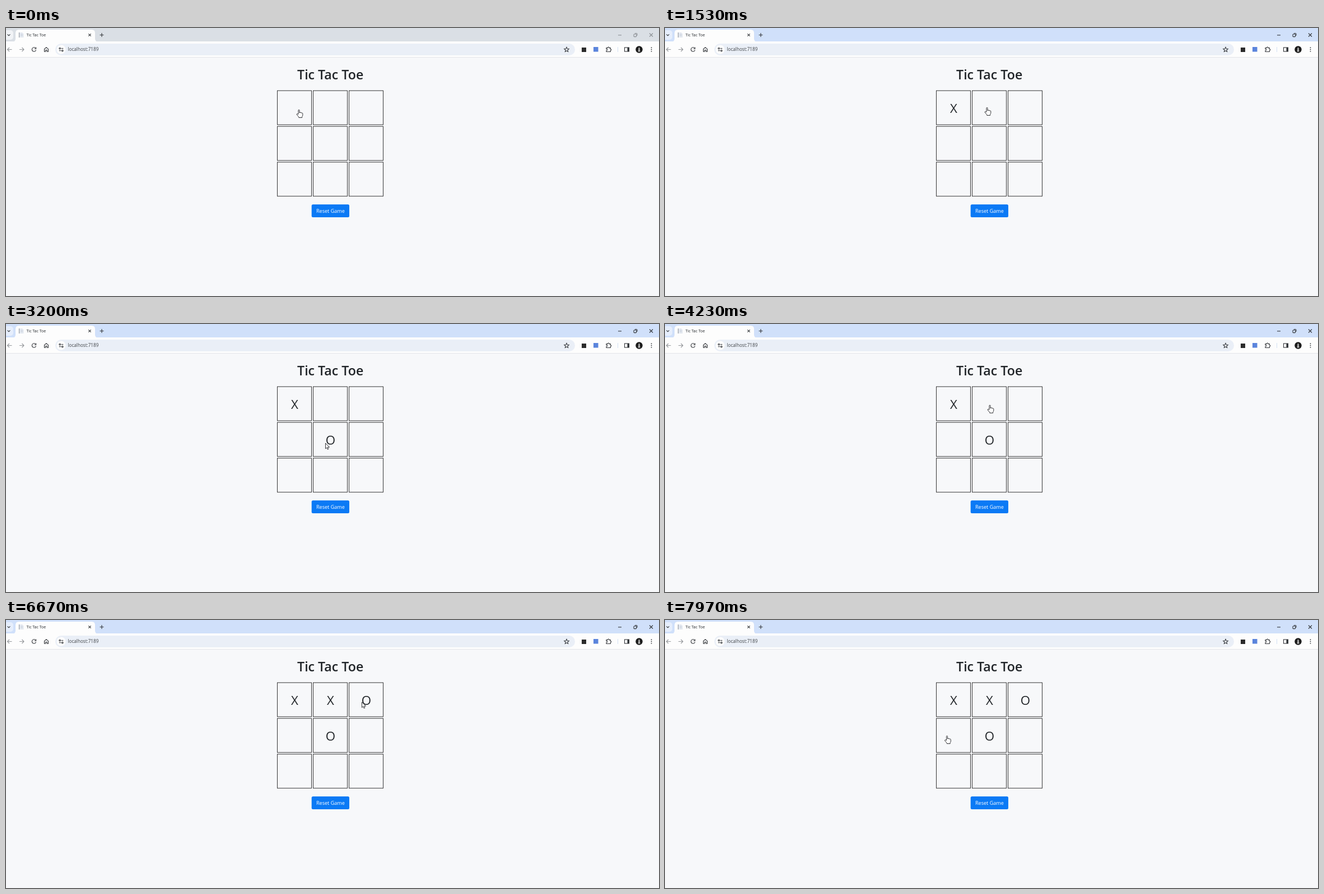
Recreate the animation shown at these times as an HTML page. Size 1166 by 480 pixels, loop 8 s.

```html
<!DOCTYPE html>
<html lang="en">
<head>
<meta charset="utf-8">
<title>Tic Tac Toe</title>
<style>
  html, body { margin: 0; width: 100%; height: 100%; overflow: hidden; background: #f7f8fa; }
  svg { display: block; width: 1166px; height: 480px; }
  text { font-family: "Open Sans", "Noto Sans", sans-serif; fill: #212529; }
  .mid { text-anchor: middle; }
  .mark { font-size: 22.3px; }
  .icon { fill: none; stroke: #33363a; stroke-width: 1.1; }
  .dim { stroke: #94979b; }
  .cell { fill: none; stroke: #363636; }
  .pointer { fill: #fff; stroke: #1d1f22; stroke-width: .9; stroke-linejoin: round; }
</style>
</head>
<body>
<svg viewBox="0 0 1166 480">
  <rect width="1166" height="480" fill="#f7f8fa"/>

  <!-- tab strip -->
  <rect id="strip" width="1166" height="25"/>
  <rect id="menu" x="-6" y="4" width="19" height="17" rx="5"/>
  <path class="icon" d="M2.6 11.3L5 13.7L7.4 11.3"/>
  <path fill="#fdfdfd" d="M12 25Q17 24 17 19V9Q17 3 23 3H153Q159 3 159 9V19Q159 24 164 25Z"/>
  <path d="M23 8H29L31.5 10.5V17H23Z" fill="#e3e8f0"/>
  <path d="M23.5 8V17" stroke="#8f959d"/>
  <path d="M26 11.5H30M26 13.5H30" stroke="#c3cbd8" stroke-width=".7"/>
  <text x="36.5" y="15.2" font-size="7">Tic Tac Toe</text>
  <path class="icon" d="M147.3 10.3L151.7 14.7M151.7 10.3L147.3 14.7"/>
  <path class="icon" d="M167.6 12.5H174.4M171 9.1V15.9"/>
  <g id="controls" class="icon">
    <path d="M1093 12.8H1099"/>
    <rect x="1121" y="11" width="4.6" height="4.6" rx="1"/>
    <path d="M1122.8 9.5H1125.6Q1127 9.5 1127 11V13.8"/>
    <path d="M1149 9.5L1155 15.5M1155 9.5L1149 15.5"/>
  </g>

  <!-- toolbar -->
  <rect y="24" width="1166" height="28" fill="#fdfdfd"/>
  <path d="M0 52.5H1166" stroke="#e3e5e9"/>
  <rect x="88" y="28" width="928" height="21" rx="10.5" fill="#eaeff7"/>
  <circle cx="98.5" cy="38.5" r="8" fill="#fdfdfd"/>
  <path class="icon dim" d="M10.5 38.5H2.5M6 35L2.5 38.5L6 42"/>
  <path class="icon dim" d="M24 38.5H32M28.5 35L32 38.5L28.5 42"/>
  <path class="icon" d="M52.7 36A3.6 3.6 0 1 0 53.5 39.3M53.6 34.6V37.3H50.9"/>
  <path class="icon" d="M68.5 37.7L72 34.8L75.5 37.7V42.3H73.2V39.5H70.8V42.3H68.5Z"/>
  <g class="icon">
    <circle cx="96.2" cy="36.6" r="1.3"/><path d="M98.8 36.6H102.3"/>
    <circle cx="100.8" cy="40.6" r="1.3"/><path d="M94.8 40.6H98.2"/>
  </g>
  <text x="110.5" y="41.4" font-size="8.15" style="fill:#3f4347">localhost:7189</text>
  <path class="icon" d="M1001 34.3L1002.2 37.1L1005.2 37.4L1002.9 39.4L1003.6 42.4L1001 40.8L998.4 42.4L999.1 39.4L996.8 37.4L999.8 37.1Z"/>
  <rect x="1028" y="35" width="8" height="8" fill="#2b2b2b"/>
  <rect x="1049" y="34" width="8.5" height="8.5" fill="#5b84dc"/>
  <path class="icon" d="M1072 35.6H1074.4Q1074.4 34 1075.7 34T1077 35.6H1079.3V37.8Q1080.8 37.8 1080.8 39T1079.3 40.2V42.5H1072V40.5Q1073.7 40.4 1073.7 39T1072 37.6Z"/>
  <path d="M1092.5 34V43" stroke="#d3e0f4"/>
  <rect class="icon" x="1104.5" y="35" width="8" height="7"/>
  <path d="M1109.5 35H1112.5V42H1109.5Z" fill="#33363a"/>
  <circle cx="1130.5" cy="38.5" r="6.2" fill="#1b1b1b"/>
  <path d="M1129.3 36.2a1.2 1.2 0 1 1 2.4 0V38L1132.6 42.6H1128.4L1129.3 38Z" fill="#b5b5b5"/>
  <g fill="#33363a">
    <circle cx="1152.5" cy="35.2" r=".9"/><circle cx="1152.5" cy="38.5" r=".9"/><circle cx="1152.5" cy="41.8" r=".9"/>
  </g>

  <!-- page -->
  <text class="mid" x="579.2" y="92.3" font-size="23.2" font-weight="600">Tic Tac Toe</text>
  <g id="board"></g>
  <rect x="545.7" y="316" width="67.3" height="23" rx="2.5" fill="#0b7af5"/>
  <text class="mid" x="579.4" y="331" font-size="9.1" style="fill:#fff">Reset Game</text>

  <path id="hand" class="pointer" d="M-1 8V1a1 1 0 0 1 2 0V5.5Q1 4.5 2 4.5T3 5.5Q3.2 4.8 4 4.9T5 6Q5.3 5.4 6 5.6T6.8 6.8V9.5Q6.8 11 5.6 12.2V14H-.2V12.8L-3.8 8.6Q-4.2 7.2 -2.8 7.1Z"/>
  <path id="arrow" class="pointer" d="M0 0V9.8L2.2 7.8L3.7 11.2L5.3 10.5L3.8 7.2H7Z"/>
</svg>
<script>
const LOOP = 8000, FOCUS = 400;
const LEFT = 484.5, TOP = 112.2, PITCH = 64, SIZE = 61;
const $ = id => document.getElementById(id);

// time, cell index, mark
const moves = [[FOCUS, 0, 'X'], [2550, 4, 'O'], [4850, 1, 'X'], [6400, 2, 'O']];

// time, x, y of the pointer's hot spot
const path = [
  [0, 523, 146.5], [800, 523, 146.5], [1350, 575, 142.5], [1800, 575, 142.5],
  [2350, 570.5, 213.5], [3300, 570.5, 213.5], [3900, 580, 145], [4700, 580, 146],
  [5800, 580, 146], [6250, 635.5, 147], [6850, 635.5, 147], [7600, 503.5, 207.5], [LOOP, 503.5, 207.5]
];

function add(name, attrs) {
  const el = document.createElementNS('http://www.w3.org/2000/svg', name);
  for (const key in attrs) el.setAttribute(key, attrs[key]);
  return $('board').appendChild(el);
}

const marks = [];
for (let i = 0; i < 9; i++) {
  const x = LEFT + i % 3 * PITCH, y = TOP + Math.floor(i / 3) * PITCH;
  add('rect', { class: 'cell', x, y, width: SIZE, height: SIZE });
  marks.push(add('text', { class: 'mid mark', x: x + 31, y: y + 40 }));
}

function pointerAt(t) {
  const i = path.findIndex(p => p[0] > t);
  const [t0, x0, y0] = path[i - 1], [t1, x1, y1] = path[i];
  const u = (t - t0) / (t1 - t0), e = u * u * (3 - 2 * u);
  return [x0 + (x1 - x0) * e, y0 + (y1 - y0) * e];
}

function cellAt(x, y) {
  const dx = x - LEFT, dy = y - TOP;
  if (dx % PITCH > SIZE || dy % PITCH > SIZE) return -1;
  return Math.floor(dy / PITCH) * 3 + Math.floor(dx / PITCH);
}

function draw() {
  const t = performance.now() % LOOP;
  const cells = Array(9).fill('');
  for (const [at, cell, mark] of moves) if (t >= at) cells[cell] = mark;
  marks.forEach((el, i) => { if (el.textContent !== cells[i]) el.textContent = cells[i]; });

  const active = t >= FOCUS;
  $('strip').style.fill = active ? '#d0e0fa' : '#dadfe5';
  $('menu').style.fill = active ? '#e6eefc' : '#f1f3f6';
  $('controls').style.stroke = active ? '#33363a' : '#8b8f94';

  const [x, y] = pointerAt(t);
  const free = cells[cellAt(x, y)] === '';
  for (const id of ['hand', 'arrow']) {
    $(id).setAttribute('transform', `translate(${x} ${y})`);
    $(id).style.display = (id === 'hand') === free ? '' : 'none';
  }
  requestAnimationFrame(draw);
}
draw();
</script>
</body>
</html>
```
